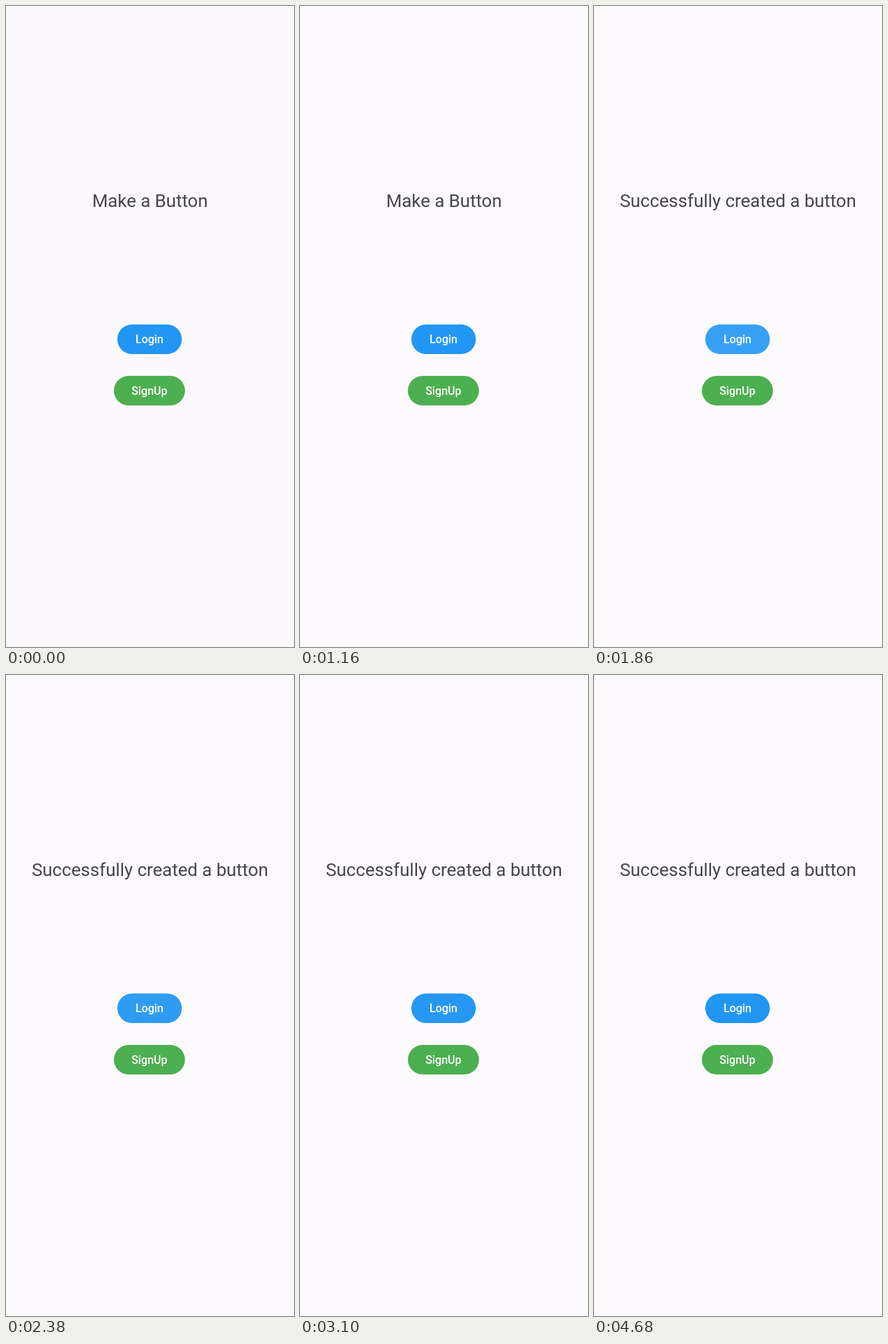
An HTML page for the animation above (4.7 s loop, 502 px wide and 1116 px high).

```html
<!DOCTYPE html>
<html lang="en">
<head>
<meta charset="utf-8">
<title>Button demo</title>
<style>
  html, body {
    margin: 0;
    width: 100%;
    height: 100%;
    overflow: hidden;
  }
  body { background: #fdfafe; }
  svg {
    display: block;
    width: 502px;
    height: 1116px;
    font-family: Roboto, sans-serif;
    text-anchor: middle;
    animation: surface 4.7s step-end infinite;
  }
  .title { font-size: 31.4px; fill: #49454f; }
  .label { font-size: 19.5px; font-weight: 500; fill: #fff; }
  .before { animation: hide 4.7s step-end infinite; }
  .after { animation: show 4.7s step-end infinite; }
  .press { fill: #fff; opacity: 0; animation: press 4.7s linear infinite; }

  @keyframes surface {
    0% { background: #fcf9fd; }
    24.68%, 100% { background: #fdfafe; }
  }
  /* The tap is released at 1380 ms. */
  @keyframes hide {
    0% { opacity: 1; }
    29.36%, 100% { opacity: 0; }
  }
  @keyframes show {
    0% { opacity: 0; }
    29.36%, 100% { opacity: 1; }
  }
  @keyframes press {
    0%, 26.81% { opacity: 0; }
    36.17%, 39.57% { opacity: .1; }
    72.77%, 100% { opacity: 0; }
  }
</style>
</head>
<body>
<svg viewBox="0 0 502 1116">
  <g class="title">
    <text class="before" x="251" y="350">Make a Button</text>
    <text class="after" x="251" y="350">Successfully created a button</text>
  </g>
  <g class="label">
    <rect x="194" y="554.5" width="112.5" height="51.5" rx="25.75" fill="#2196f3"/>
    <rect class="press" x="194" y="554.5" width="112.5" height="51.5" rx="25.75"/>
    <text x="250" y="587">Login</text>
    <rect x="188" y="644" width="124" height="51.5" rx="25.75" fill="#4caf50"/>
    <text x="250" y="676.5">SignUp</text>
  </g>
</svg>
</body>
</html>
```
